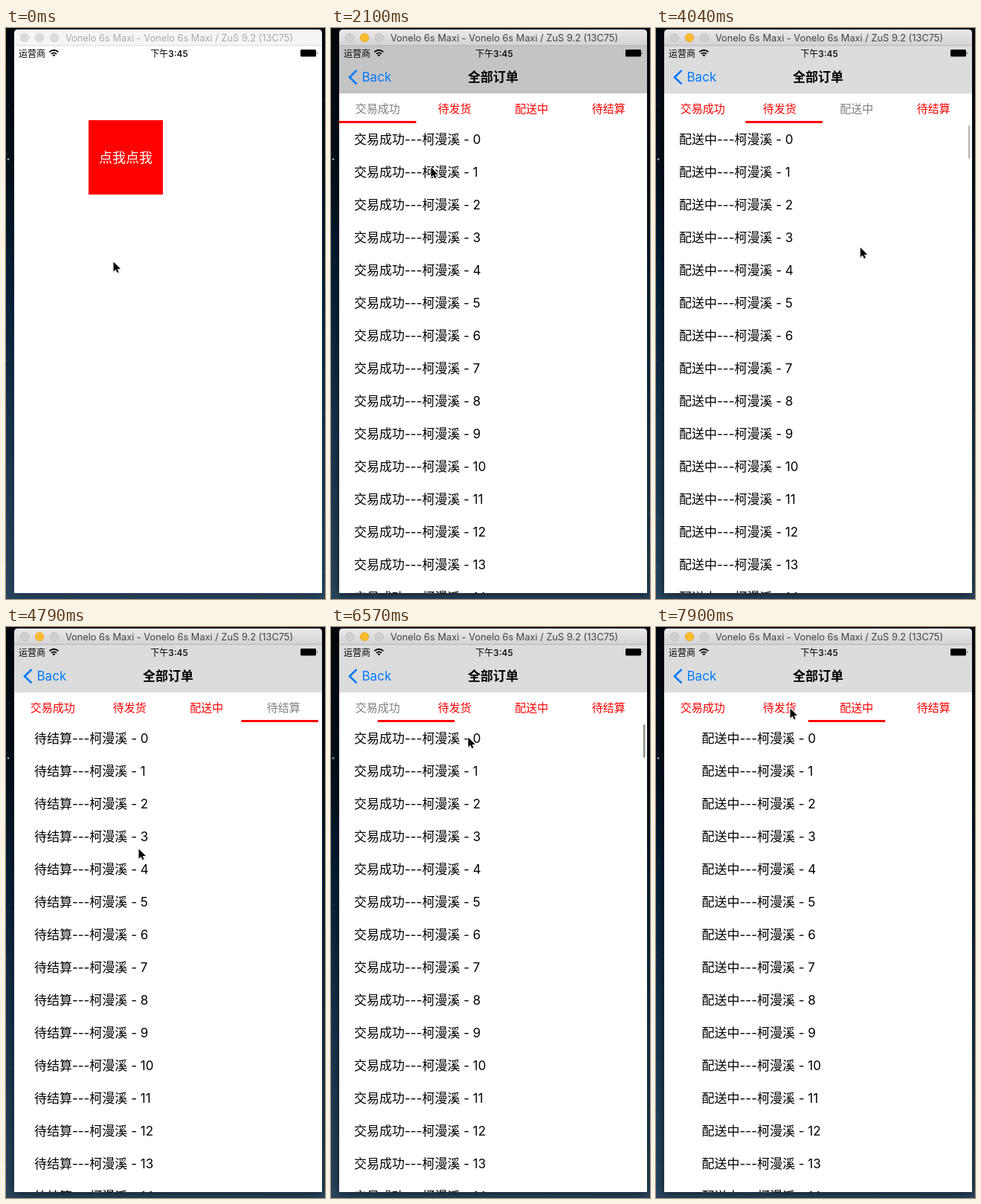
An HTML page that plays this animation: 429 by 768 pixels, repeating every 8 s.

```html
<!DOCTYPE html>
<html lang="zh-CN">
<head>
<meta charset="utf-8">
<title>全部订单</title>
<style>
  html, body { margin: 0; width: 100%; height: 100%; overflow: hidden; background: #0a2238; }
  svg { display: block; width: 429px; height: 768px; }
  text { font-family: Inter, "Noto Sans CJK SC", "Noto Sans CJK", sans-serif; white-space: pre; }
  .mid { text-anchor: middle; }
  .row { font-size: 17px; }
  .tab { font-size: 15px; text-anchor: middle; }
  .status { font-size: 12px; }
</style>
</head>
<body>
<svg viewBox="0 0 429 768">
  <defs>
    <linearGradient id="sky" x2="0" y2="1">
      <stop offset="0" stop-color="#03080f"/>
      <stop offset=".25" stop-color="#03101d"/>
      <stop offset=".45" stop-color="#06213a"/>
      <stop offset=".7" stop-color="#17344f"/>
      <stop offset="1" stop-color="#29465f"/>
    </linearGradient>
    <linearGradient id="bar" x2="0" y2="1">
      <stop offset="0" stop-color="#ebe9eb"/>
      <stop offset="1" stop-color="#d3d1d3"/>
    </linearGradient>
    <filter id="blur" x="-10%" y="-10%" width="120%" height="120%"><feGaussianBlur stdDeviation="7"/></filter>
    <clipPath id="screen"><rect x="11" y="24" width="414" height="736"/></clipPath>
    <clipPath id="list"><rect y="128" width="414" height="632"/></clipPath>
  </defs>

  <rect width="429" height="768" fill="url(#sky)"/>
  <g id="stars" fill="#a9c4d8"></g>
  <rect id="shadow" x="11" y="10" width="414" height="752" filter="url(#blur)"/>

  <path id="titlebar" d="M11 24V7q0-5 5-5H420q5 0 5 5V24z"/>
  <path id="rule" d="M11 23.5H425"/>
  <g id="lights" stroke-width=".7">
    <circle cx="25" cy="13" r="5.8"/><circle cx="45" cy="13" r="5.8"/><circle cx="65" cy="13" r="5.8"/>
  </g>
  <text id="caption" class="mid" x="233" y="18" font-size="12.8">Vonelo 6s Maxi - Vonelo 6s Maxi / ZuS 9.2 (13C75)</text>

  <g clip-path="url(#screen)">
    <rect x="11" y="24" width="414" height="736" fill="#fff"/>
    <g id="home">
      <rect x="111" y="124" width="100" height="100" fill="#f00"/>
      <text class="mid" x="161" y="180.5" font-size="18" fill="#fff">点我点我</text>
    </g>
    <g id="orders">
      <rect y="24" width="414" height="736" fill="#fff"/>
      <rect id="navbar" y="24" width="414" height="64"/>
      <g id="tabs"></g>
      <g clip-path="url(#list)"><g id="pages"></g></g>
      <rect id="underline" y="125" width="103.5" height="3" fill="#f00"/>
    </g>
    <g id="navItems">
      <path d="M34.5 57L25 66.2L34.5 75.4" fill="none" stroke="#007aff" stroke-width="2.6"/>
      <text x="41.5" y="72" font-size="17" fill="#007aff">Back</text>
      <text class="mid" x="218" y="72" font-size="17" font-weight="600">全部订单</text>
    </g>
    <text class="status" x="17" y="38.5">运营商</text>
    <g fill="none" stroke="#000" stroke-width="1.8">
      <path d="M58.4 32.3q6-5 12 0M60.8 34.9q3.6-3 7.2 0"/>
      <path d="M62.4 36.2q2-1.6 4 0L64.4 38.4z" fill="#000" stroke="none"/>
    </g>
    <text class="status mid" x="219.5" y="38.5" font-weight="500">下午3:45</text>
    <rect x="396" y="29" width="21" height="9.5" rx="1.5"/>
    <path d="M418 32q1.6 1.8 0 3.6z"/>
  </g>

  <g id="cursor">
    <g transform="translate(.5 .5) scale(.93)">
      <path d="M1 1.5V15.5L4.3 12.4L6.4 17L8.7 16L6.7 11.5H11z" opacity=".25" stroke="#000" stroke-opacity=".5"/>
      <path d="M0 0V14L3.3 11L5.3 15.7L7.6 14.7L5.6 10.2H10.2z" stroke="#fff" stroke-width="2" paint-order="stroke"/>
    </g>
  </g>
</svg>

<script>
const LOOP = 8000, FIRST = 450, TICK = 149;
const PAGE = 414, TAB = PAGE / 4, SCROLL = 400, SLIDE = 300;
const names = ['交易成功', '待发货', '配送中', '待结算'];

// A swipe marks its tab after the page settles; a tap moves both at once.
const moves = [
  { to: 1, at: 2720 }, { to: 2, at: 3580 }, { to: 3, at: 4114 },
  { to: 2, at: 4738 }, { to: 1, at: 5385 }, { to: 0, at: 6009 },
  { to: 2, at: 7050, tap: true }, { to: 1, at: 7830, tap: true }
];

// page, start, end of each scroll indicator flash
const flashes = [[1, 3000, 3580], [2, 3900, 4250], [3, 4350, 4700],
                 [1, 5600, 6050], [0, 6300, 6850], [2, 7350, 7750]];

// time, x, y of the pointer tip
const path = [
  [450, 144, 314], [1340, 164, 174], [1750, 164, 174], [2089, 134, 187],
  [2690, 315, 280], [2930, 205, 286], [3430, 254, 284], [3580, 290, 288],
  [3780, 180, 293], [4090, 285, 295], [4300, 185, 297], [4771, 178, 298],
  [4960, 265, 306], [5380, 115, 312], [5665, 177, 317], [5800, 190, 317],
  [6000, 120, 305], [6200, 215, 270], [6559, 184, 148], [7000, 264, 110],
  [7200, 264, 110], [7750, 180, 109]
];

const $ = id => document.getElementById(id);
const clamp = v => Math.max(0, Math.min(1, v));
const ease = v => (1 - Math.cos(Math.PI * clamp(v))) / 2;
const mix = (a, b, p) => a + (b - a) * p;
const shift = (node, x, y = 0) => node.setAttribute('transform', `translate(${x} ${y})`);

function add(parent, tag, attrs, text = '') {
  const node = document.createElementNS('http://www.w3.org/2000/svg', tag);
  for (const key in attrs) node.setAttribute(key, attrs[key]);
  node.textContent = text;
  return parent.appendChild(node);
}

for (let i = 0; i < 22; i++) {
  const x = i % 4 ? (i * 4.7) % 10 : 426 + i % 3;
  add($('stars'), 'circle', { cx: x, cy: (i * 139 + 176) % 768, r: .5, opacity: .45 });
}
add($('stars'), 'circle', { cx: 3, cy: 176.5, r: 1.3 });

const tabs = names.map((name, i) =>
  add($('tabs'), 'text', { class: 'tab', x: (i + .5) * TAB, y: 113.5 }, name));

const bars = names.map((name, i) => {
  const page = add($('pages'), 'g', { transform: `translate(${i * PAGE} 0)` });
  for (let n = 0; n < 15; n++)
    add(page, 'text', { class: 'row', x: 20, y: 156 + n * 44 }, `${name}---柯漫溪 - ${n}`);
  return add(page, 'rect', { x: 409, y: 131, width: 2.4, height: 45, rx: 1.2 });
});

function pointer(t) {
  let i = path.findIndex(p => p[0] > t);
  if (i < 0) i = path.length;
  if (!i) return path[0].slice(1);
  const a = path[i - 1], b = path[i] || a;
  const p = ease((t - a[0]) / (b[0] - a[0] || 1));
  return [mix(a[1], b[1], p), mix(a[2], b[2], p)];
}

function scrollState(t) {
  let page = 0, line = 0, selected = 0;
  for (const { to, at, tap } of moves) {
    if (t < at) break;
    const settled = at + SCROLL;
    page = mix(page, to, ease((t - at) / SCROLL));
    line = mix(line, to, ease((t - (tap ? at : settled)) / SLIDE));
    if (t >= settled) selected = to;
    else if (tap) selected = -1;
  }
  return { page, line, selected };
}

function drawWindow(active) {
  $('shadow').setAttribute('opacity', active ? .6 : .3);
  $('titlebar').setAttribute('fill', active ? 'url(#bar)' : '#f6f5f6');
  $('rule').setAttribute('stroke', active ? '#b6b4b6' : '#dddcdd');
  $('caption').setAttribute('fill', active ? '#444' : '#aaa');
  [...$('lights').children].forEach((light, i) => {
    const lit = active && i === 1;
    light.setAttribute('fill', lit ? '#fdbc30' : active ? '#d0ced0' : '#dcdadc');
    light.setAttribute('stroke', lit ? '#dfa023' : active ? '#bebcbe' : '#d0ced0');
  });
}

function draw(t) {
  drawWindow(t >= 1490);

  const push = ease((t - 1540) / 450);
  shift($('home'), -.3 * PAGE * push);
  shift($('orders'), 11 + PAGE * (1 - push));
  shift($('navItems'), 90 * (1 - push));
  $('navItems').setAttribute('opacity', push);
  const grey = Math.round(mix(196, 220, ease((t - 2150) / 350)));
  $('navbar').setAttribute('fill', `rgb(${grey},${grey},${grey})`);

  const { page, line, selected } = scrollState(t);
  shift($('pages'), -page * PAGE);
  $('underline').setAttribute('x', line * TAB);
  tabs.forEach((tab, i) => tab.setAttribute('fill', i === selected ? '#808080' : '#f00'));
  bars.forEach((bar, i) => {
    const alpha = flashes.filter(f => f[0] === i)
      .map(([, from, to]) => clamp(Math.min(t - from, to - t) / 200));
    bar.setAttribute('opacity', .45 * Math.max(0, ...alpha));
  });

  shift($('cursor'), ...pointer(t));
}

function loop() {
  const t = performance.now() % LOOP;
  draw(t < FIRST ? 0 : FIRST + Math.floor((t - FIRST) / TICK) * TICK);
  requestAnimationFrame(loop);
}
loop();
</script>
</body>
</html>
```
